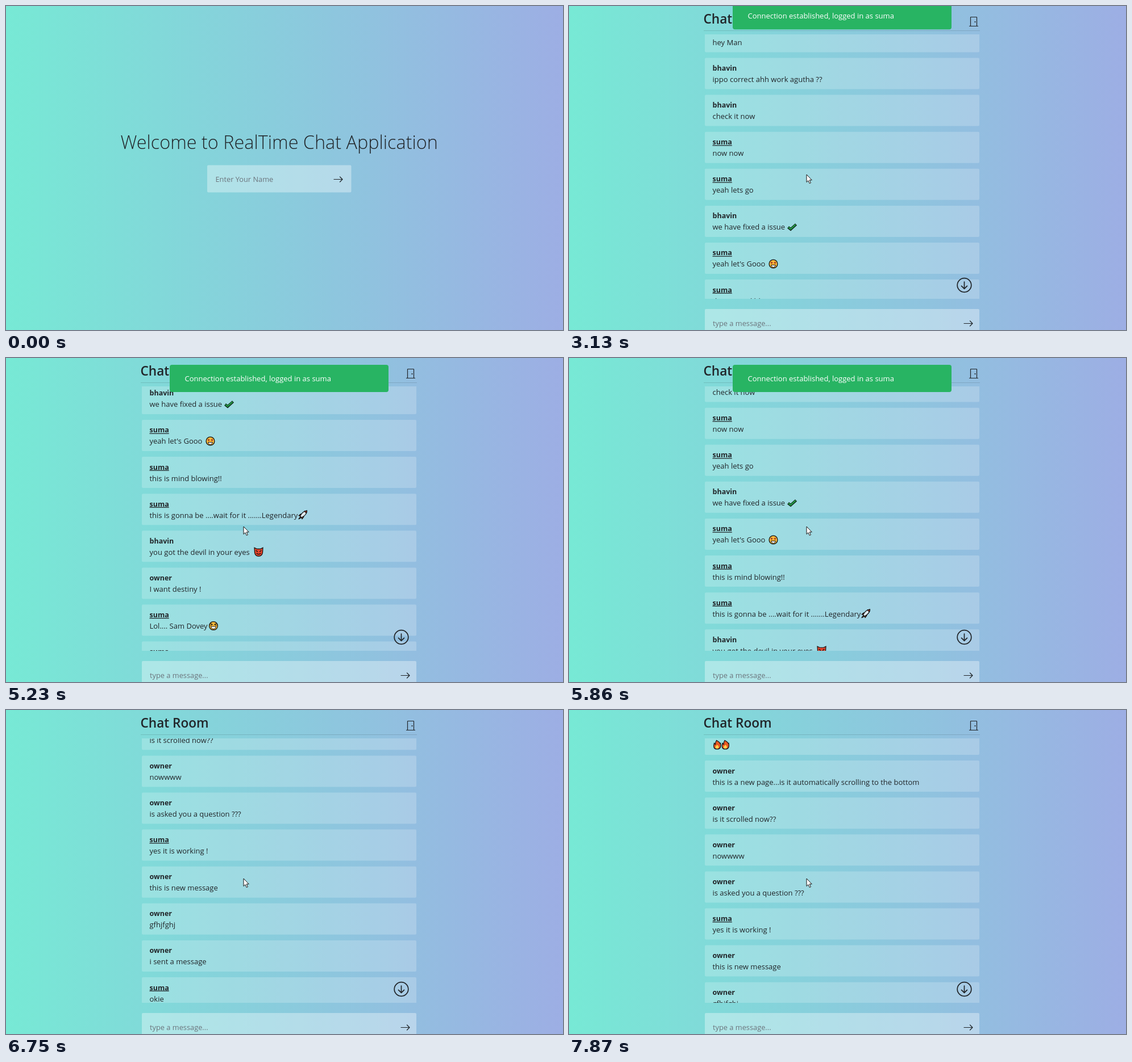
Recreate the animation shown at these times as an HTML page. Size 980 by 571 pixels, loop 8 s.

```html
<!DOCTYPE html>
<html lang="en">
<head>
<meta charset="utf-8">
<title>Chat room</title>
<style>
html, body { margin: 0; width: 100%; height: 100%; overflow: hidden; }
body { background: linear-gradient(to right, #77e9d5, #9daee4); }
svg { display: block; }
text { font: 13px "Open Sans", "Noto Sans", sans-serif; fill: #212529; white-space: pre; }
.title { font-size: 32.4px; font-weight: 300; }
.head { font-size: 22.6px; font-weight: 600; }
.name { font-size: 12.5px; font-weight: 700; }
.hint { font-size: 12.8px; fill: #6c757d; }
.toast { fill: #fff; }
.card { fill: #fff; fill-opacity: .2; }
.box { fill: #fff; fill-opacity: .35; }
.line { fill: none; stroke: #212529; stroke-width: 1.2; stroke-linecap: round; stroke-linejoin: round; }
.bold { stroke-width: 1.7; }
.ink { fill: none; stroke: #111; stroke-width: 1.2; stroke-linecap: round; }
</style>
</head>
<body>
<svg id="stage" width="980" height="571" viewBox="0 0 980 571">
  <defs>
    <path id="arrow" class="line" d="M-7.5 0H7.5M3 -4.5L7.5 0L3 4.5"/>
    <g id="face"><circle r="7.4" fill="#fdbd3c" stroke="#111" stroke-width="1.3"/></g>
    <g id="check" fill="none">
      <path d="M-7 .5L-2.5 4L7 -4.5" stroke="#10271a" stroke-width="4.6"/>
      <path d="M-6.2 .8L-2.5 3.7L6.2 -4.1" stroke="#22a046" stroke-width="2.2"/>
    </g>
    <g id="stars">
      <use href="#face"/>
      <path d="M-5 -2H-1M-3 -4V0M1 -2H5M3 -4V0" stroke="#a33b20" stroke-width="1.6"/>
      <path d="M-4 2H4Q3 6 0 6T-4 2Z" fill="#fff" stroke="#111"/>
    </g>
    <g id="laugh">
      <use href="#face"/>
      <path class="ink" d="M-5 -4L-2 -2.5L-5 -1M5 -4L2 -2.5L5 -1"/>
      <path d="M-4.5 1H4.5Q3.5 5.5 0 5.5T-4.5 1Z" fill="#fff" stroke="#111"/>
    </g>
    <g id="cool">
      <use href="#face"/>
      <path d="M-7.5 -4H7.5L6 0Q3 2 1 -1.5H-1Q-3 2 -6 0Z" fill="#111"/>
      <path class="ink" d="M-3 3.5Q0 5.5 3.5 3"/>
    </g>
    <g id="devil">
      <path d="M-7.5 -7.5L-3.5 -5.5H3.5L7.5 -7.5L7 1Q6 7.5 0 7.5T-7 1Z" fill="#e2442b" stroke="#111" stroke-width="1.2"/>
      <path class="ink" d="M-4.5 -2.5L-2 -.5M4.5 -2.5L2 -.5M-3.5 2.5Q0 5.5 3.5 2.5"/>
    </g>
    <g id="rocket" stroke="#111" stroke-width="1.2" stroke-linejoin="round">
      <path d="M-3 -2L-7 1L-4 2ZM2 3L-1 7L-2 4ZM-4 3L-7 7L-3 5Z" fill="#e8622c"/>
      <path d="M7.5 -7.5Q0 -7 -4.5 2L-2 4.5Q7 0 7.5 -7.5Z" fill="#dfe9ee"/>
      <path d="M7.5 -7.5L3 -6.5L6.5 -3Z" fill="#d8432b"/>
    </g>
    <g id="fire">
      <path d="M-1 -8Q6 -4 5 -2L6 -3Q8 7.5 0 7.5T-5 -3L-3 -1Q-3 -5 -1 -8Z" fill="#ea5a24" stroke="#111" stroke-width="1.2"/>
      <path d="M0 0Q3.5 2 3 5Q0 8 -3 5Q-3 2 0 0Z" fill="#ffd24a"/>
    </g>
  </defs>

  <g id="login">
    <text class="title" x="201.5" y="252">Welcome to RealTime Chat Application</text>
    <rect class="box" x="354" y="280.5" width="253.5" height="48" rx="2"/>
    <text id="field" class="hint" x="368.5" y="309.5"></text>
    <path id="caret" stroke="#000" d="M0 295V313"/>
    <use href="#arrow" x="584.5" y="305.5"/>
  </g>

  <g id="room">
    <text class="head" x="236.5" y="31">Chat Room</text>
    <g class="line">
      <path d="M706.5 35.5V20Q706.5 19.5 707 19.5H717Q717.5 19.5 717.5 20V35.5M704.5 35.5H719.5"/>
      <circle cx="714.5" cy="28" r=".5"/>
    </g>
    <path d="M237 43.5H723" stroke="#000" stroke-opacity=".13"/>
    <svg y="50" width="980" height="466"><g id="list"></g></svg>
    <g class="line bold">
      <circle cx="695.5" cy="492" r="12.3"/>
      <path d="M695.5 486V498M690.5 493.3L695.5 498.3L700.5 493.3"/>
    </g>
    <rect class="box" x="239" y="534" width="483" height="48" rx="2"/>
    <text class="hint" x="253" y="563.5">type a message...</text>
    <use href="#arrow" x="702.5" y="559.5"/>
    <g id="toast">
      <rect x="288" y="12" width="385" height="48" rx="4" fill="#28b463"/>
      <text class="toast" x="314.5" y="41">Connection established, logged in as suma</text>
    </g>
  </g>

  <path id="pointer" d="M0 0V13.5L3 10.7L5.2 15.7L7.4 14.7L5.2 9.8H9.3Z" fill="#fff" stroke="#111"/>
  <path id="beam" d="M-3 -6.5H-1L0 -5.5L1 -6.5H3M0 -5.5V5.5M-3 6.5H-1L0 5.5L1 6.5H3" fill="none" stroke="#111"/>
</svg>

<script>
const LOOP = 8000, ENTER = 2730, PITCH = 65.1, LEFT = 252.5;
const $ = id => document.getElementById(id);

const me = 'suma', friend = 'bhavin', host = 'owner';
// sender, text, then emoji name and its centre x
const messages = [
  [host, '', 'fire', 260, 'fire', 275],
  [host, 'this is a new page...is it automatically scrolling to the bottom'],
  [host, 'is it scrolled now??'],
  [host, 'nowwww'],
  [host, 'is asked you a question ???'],
  [me, 'yes it is working !'],
  [host, 'this is new message'],
  [host, 'gfhjfghj'],
  [host, 'i sent a message'],
  [me, 'okie'],
  [friend, 'hey Man'],
  [friend, 'ippo correct ahh work agutha ??'],
  [friend, 'check it now'],
  [me, 'now now'],
  [me, 'yeah lets go'],
  [friend, 'we have fixed a issue', 'check', 392.5],
  [me, "yeah let's Gooo", 'stars', 359.5],
  [me, 'this is mind blowing!!'],
  [me, 'this is gonna be ....wait for it .......Legendary', 'rocket', 522],
  [friend, 'you got the devil in your eyes', 'devil', 444.5],
  [host, 'I want destiny !'],
  [me, 'Lol.... Sam Dovey', 'laugh', 365],
  [me, 'Sam Dovey.. Architect', 'cool', 395],
  [friend, 'is redis channel layer working??'],
  [me, 'yup its working clean..', 'fire', 394],
];

const pen = document.createElement('canvas').getContext('2d');
pen.font = '13px "Open Sans", "Noto Sans", sans-serif';

$('list').innerHTML = messages.map(([who, text, ...icons], i) => {
  const end = LEFT + pen.measureText(text).width;
  let marks = '';
  // keep emoji clear of the text
  for (let k = 0; k < icons.length; k += 2)
    marks += `<use href="#${icons[k]}" x="${Math.max(icons[k + 1], end + 8)}" y="37.5"/>`;
  const line = who === me ? ' text-decoration="underline"' : '';
  return `<g transform="translate(0 ${i * PITCH})">
    <rect class="card" x="239" width="483" height="55" rx="2"/>
    <text class="name" x="${LEFT}" y="22.5"${line}>${who}</text>
    <text x="${LEFT}" y="42.5">${text}</text>${marks}</g>`;
}).join('');

const clamp = x => Math.min(1, Math.max(0, x));
const linear = x => x;
const smooth = x => x * x * (3 - 2 * x);
const out = x => 1 - (1 - x) ** 2;

// keys: [time, value, easing towards this key]
function track(keys, t) {
  let value = keys[0][1];
  for (let i = 1; i < keys.length; i++) {
    const [t0, v0] = keys[i - 1], [t1, v1, ease = linear] = keys[i];
    if (t >= t0) value = v0 + (v1 - v0) * ease(clamp((t - t0) / (t1 - t0)));
  }
  return value;
}

const scroll = [[2750, 50], [3437, -1110, smooth], [4585, -1110], [4610, -1104],
  [5860, -759], [6030, -728, out], [6150, -728], [6680, -135, smooth],
  [6750, -115], [7870, 24]];
const toastY = [[3000, -60], [3298, 0, out], [6300, 0], [6600, -62, smooth]];
const mouseX = [[400, 985], [990, 408, out], [1180, 408], [1530, 419, smooth]];
const mouseY = [[400, 570], [990, 290, out], [1180, 290], [1530, 298, smooth]];
const typing = [[2410, 'suma'], [2170, 'su'], [2090, 's']];

const show = (id, on) => $(id).style.display = on ? '' : 'none';
const move = (id, x, y) => $(id).setAttribute('transform', `translate(${x} ${y})`);

function frame() {
  const t = performance.now() % LOOP, login = t < ENTER;
  show('login', login);
  show('room', !login);

  const x = track(mouseX, t), y = track(mouseY, t);
  const overField = login && x < 607 && y > 281;
  show('pointer', t >= 430 && !overField);
  show('beam', t >= 430 && overField);
  move('pointer', x - 1, y - 1);
  move('beam', x, y);

  if (login) {
    const typed = typing.find(([at]) => t >= at)?.[1] || '';
    const field = $('field');
    field.textContent = typed || 'Enter Your Name';
    field.style.fill = typed ? '#212529' : '';
    show('caret', t >= 1530);
    move('caret', 368.5 + (typed ? field.getComputedTextLength() : 0), 0);
  } else {
    move('list', 0, track(scroll, t) - 50);
    move('toast', 0, track(toastY, t));
  }
  requestAnimationFrame(frame);
}
frame();
</script>
</body>
</html>
```
